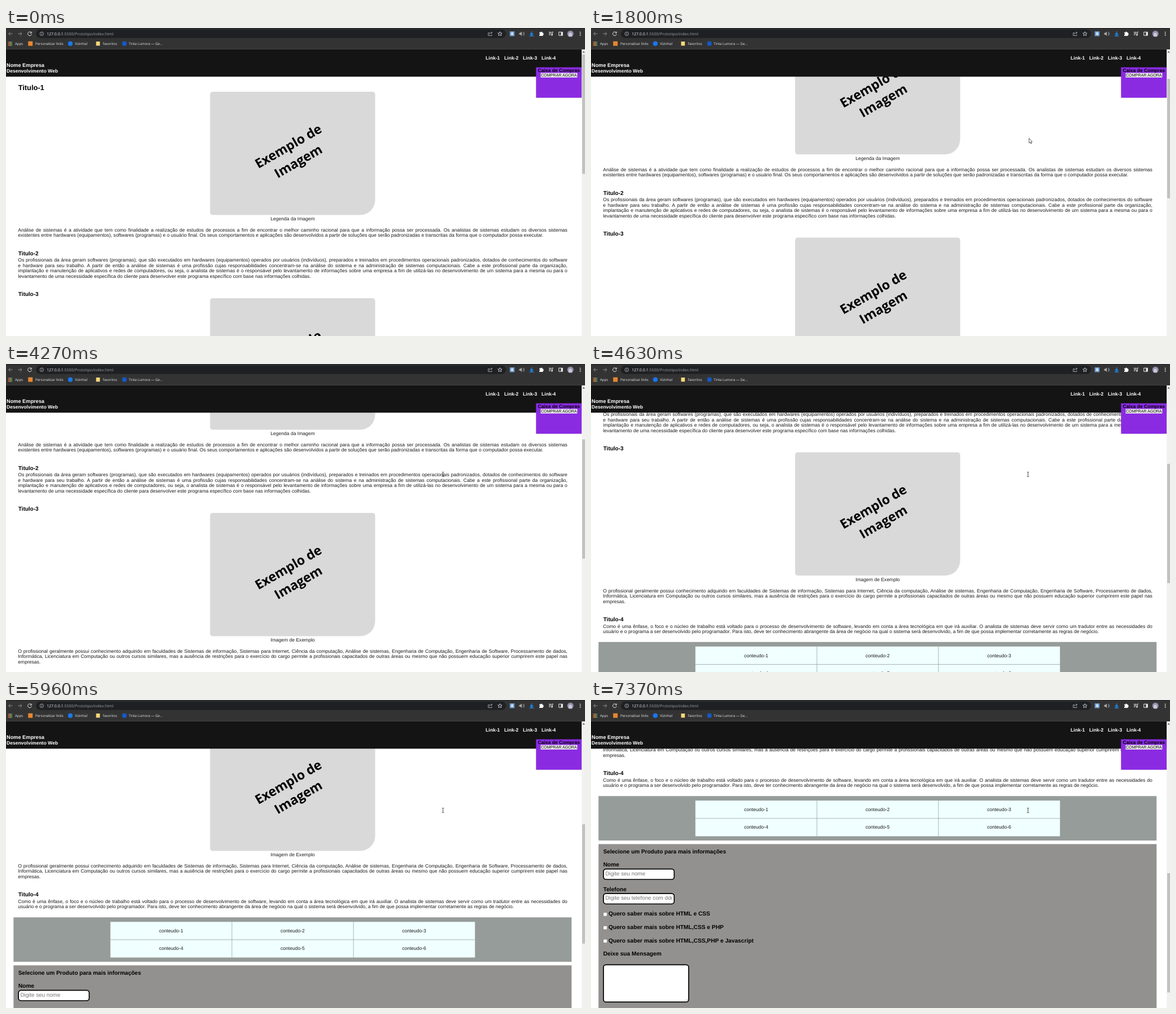
Animation of 1025x546 px, one loop 8000 ms. Source, as an HTML page:

```html
<!DOCTYPE html>
<html lang="pt-BR">
<head>
<meta charset="utf-8">
<title>Protótipo</title>
<style>
html, body { margin: 0; width: 100%; height: 100%; overflow: hidden; background: #fff; }
body { font: 8.54px "Liberation Sans", Arial, sans-serif; color: #000; text-rendering: geometricPrecision; }
#stage { position: absolute; left: 0; top: 0; width: 1025px; height: 546px; overflow: hidden; }
#page { position: absolute; left: 0; top: 0; width: 1019px; height: 1300px; }
.t, svg { position: absolute; }
.t { line-height: 0; white-space: nowrap; }
.b { font-weight: bold; }
.h1 { font-size: 12.8px; }
.h3 { font-size: 10px; }
.label { font-size: 10.2px; }
.mid { width: 300px; text-align: center; }
.full { width: 972.5px; text-align: justify; text-align-last: justify; white-space: normal; }
.body { color: #1a1a1a; }
.white { color: #fff; }
.hint { color: #757575; font-size: 9.8px; width: 118.5px; clip-path: inset(-10px 0); }
.btn { font-size: 7.12px; }
svg { left: 0; top: 0; overflow: visible; }
.ui { font-family: "Open Sans", "Noto Sans", sans-serif; fill: #e8eaed; font-size: 6.1px; }
.pictext { font: bold 23px "Open Sans", "Noto Sans", sans-serif; text-anchor: middle; }
</style>
</head>
<body>
<div id="stage">
  <div id="page"></div>
  <div id="fixed"></div>
  <svg id="chrome" width="1025" height="546">
    <path d="M0 0H1025V38H0Z" fill="#333334"/>
    <path d="M0 0H1025V1H0Z" fill="#202124"/>
    <path d="M0 37.2H1025V38H0Z" fill="#48494b"/>
    <rect x="53" y="2.6" width="832" height="15.2" rx="7.6" fill="#1f2023"/>
    <g fill="none" stroke="#e8eaed" stroke-width="1">
      <path d="M11.5 10.2H4.5M7.8 6.9L4.5 10.2L7.8 13.5M21 10.2H28M24.7 6.9L28 10.2L24.7 13.5" stroke="#8b8d90"/>
      <path d="M44.4 7.8A3.4 3.4 0 1 0 45.3 11M45.2 6.4V9H42.6"/>
      <circle cx="63.3" cy="10.2" r="3.3" stroke="#bdc1c6" stroke-width=".8"/>
      <path d="M63.3 9.7V12M63.3 8.2V9" stroke="#bdc1c6"/>
      <path d="M856 8.5H853.7V13.5H860V11.7M855.7 11.5C856 9 857.5 8.4 860.5 8.4M858.7 6.5L860.7 8.4L858.7 10.3" stroke="#bdc1c6" stroke-width=".8"/>
      <path d="M874.4 6.5L875.4 9L878.2 9.2L876.1 11L876.8 13.7L874.4 12.2L872 13.7L872.7 11L870.6 9.2L873.4 9Z" stroke-width=".8"/>
      <path d="M914.8 8A3 3 0 0 1 914.8 12.6M916 6.7A5 5 0 0 1 916 13.9" stroke="#aaa" stroke-width=".8"/>
      <path d="M930.5 6V12M927.7 9.5L930.5 12.3L933.3 9.5M926.8 14H934.2" stroke="#2389f7" stroke-width="1.4"/>
      <path d="M961 7.5H966M961 9.7H966M961 11.9H964M967.3 12V7H969"/>
      <path d="M978.7 7.2H985.3V13.2H978.7Z"/>
    </g>
    <rect x="891.8" y="6" width="8.4" height="8.4" fill="#6f9fd0"/>
    <path d="M894.7 7.5H897.3V10H899L896 13L893 10H894.7Z" fill="#dfe6ee"/>
    <path d="M908.5 8.7H910.3L913 6.3V14L910.3 11.7H908.5Z" fill="#aaa"/>
    <path d="M944 7.7H946.2A1.3 1.3 0 1 1 948.8 7.7H950.6V9.4A1.3 1.3 0 1 1 950.6 12V14H944V12A1.3 1.3 0 0 0 944 9.4Z" fill="#fff"/>
    <circle cx="966.4" cy="12.3" r="1.3" fill="#e8eaed"/>
    <path d="M982.5 7.2H985.3V13.2H982.5Z" fill="#e8eaed"/>
    <circle cx="999.2" cy="10.2" r="5.6" fill="#8e8ba6"/>
    <path d="M996 15V11Q996 8 999 8T1002 11V15Z" fill="#c9c6d8"/>
    <g id="dots"></g>
    <rect x="39.2" y="23.6" width="8" height="8" fill="#e8862d"/>
    <circle cx="113.9" cy="27.7" r="4.1" fill="#1877f2"/>
    <path d="M159.5 24H166.2V31.3H159.5Z" fill="#fbd978"/>
    <circle cx="209.6" cy="27.7" r="4.1" fill="#1459c4"/>
    <g class="ui">
      <text x="72" y="12.8" font-size="7"><tspan>127.0.0.1</tspan><tspan fill="#9aa0a6">:5500/Prototipo/index.html</tspan></text>
      <text x="16" y="29.9">Apps</text>
      <text x="52" y="29.9">Personalizar links</text>
      <text x="122" y="29.9">Vizinhal</text>
      <text x="171.6" y="29.9">favoritos</text>
      <text x="217.3" y="29.9">Tinta Lumora — Ge...</text>
    </g>
    <path d="M1019.3 38H1025V546H1019.3Z" fill="#f1f1f1"/>
    <path d="M1020.4 43.5L1022.6 41L1024.8 43.5Z" fill="#505050"/>
    <rect id="thumb" x="1020" y="47" width="5" height="211.5" fill="#c1c1c1"/>
    <g id="cursor">
      <path id="arrow" d="M0 0V8.6L2 6.8L3.3 9.8L4.6 9.2L3.3 6.4H5.8Z" fill="#fff" stroke="#222" stroke-width=".7"/>
      <path id="beam" d="M-1.8 -4H-.4L0 -3.6L.4 -4H1.8M0 -3.6V3.6M-1.8 4H-.4L0 3.6L.4 4H1.8" fill="none" stroke="#222" stroke-width=".8"/>
    </g>
  </svg>
</div>
<script>
const $ = id => document.getElementById(id);
const text = (x, y, s, cls = "") => `<div class="t ${cls}" style="left:${x}px;top:${y}px">${s}</div>`;
const mid = (x, y, s, cls = "") => text(x - 150, y, s, "mid " + cls);
const svg = s => `<svg width="1" height="1">${s}</svg>`;
const box = (x, y, w, h, fill, more = "") =>
  svg(`<rect x="${x}" y="${y}" width="${w}" height="${h}" fill="${fill}" ${more}/>`);
const title = (y, s, size = "h3") => text(21.7, y + .6, s, "b " + size);
const para = (y, lines) => lines.map((s, i) =>
  text(21.3, y + i * 9.61, s, "body" + (i < lines.length - 1 ? " full" : ""))).join("");
const picture = (y, caption) => svg(`<g transform="translate(361.3 ${y})">
  <path d="M5.3 0H286.9Q292.2 0 292.2 5.3V191.8A26.7 26.7 0 0 1 265.5 218.5H5.3Q0 218.5 0 213.2V5.3Q0 0 5.3 0Z" fill="#d9d9d9"/>
  <g class="pictext" transform="translate(146.7 111) rotate(-30)">
  <text y="-8.5">Exemplo de</text><text x="2" y="23.5">Imagem</text></g></g>`) +
  mid(507.5, y + 225.2, caption, "body");
const field = (y, w, h, hint = "") =>
  box(22.1, y + .8, w - 1.6, h - 1.6, "#fff", `rx="4.5" stroke="#000" stroke-width="1.7"`) +
  text(25.4, y + h / 2 + .1, hint, "hint");
const check = (y, s) => box(21.9, y - 2.9, 6.4, 6.4, "#fff", `rx="1" stroke="#767676" stroke-width=".6"`) +
  text(31, y + .6, s, "b label");

const cells = [0, 1, 2, 3, 4, 5].map(i =>
  mid(292.3 + i % 3 * 215.1, 838.6 + (i > 2) * 31.6, "conteudo-" + (i + 1), "body")).join("");

$("page").innerHTML =
  title(105, "Titulo-1", "h1") +
  picture(113, "Legenda da Imagem") +
  para(357.6, [
    "Análise de sistemas é a atividade que tem como finalidade a realização de estudos de processos a fim de encontrar o melhor caminho racional para que a informação possa ser processada. Os analistas de sistemas estudam os diversos sistemas",
    "existentes entre hardwares (equipamentos), softwares (programas) e o usuário final. Os seus comportamentos e aplicações são desenvolvidos a partir de soluções que serão padronizadas e transcritas da forma que o computador possa executar."]) +
  title(400, "Titulo-2") +
  para(410.9, [
    "Os profissionais da área geram softwares (programas), que são executados em hardwares (equipamentos) operados por usuários (indivíduos), preparados e treinados em procedimentos operacionais padronizados, dotados de conhecimentos do software",
    "e hardware para seu trabalho. A partir de então a análise de sistemas é uma profissão cujas responsabilidades concentram-se na análise do sistema e na administração de sistemas computacionais. Cabe a este profissional parte da organização,",
    "implantação e manutenção de aplicativos e redes de computadores, ou seja, o analista de sistemas é o responsável pelo levantamento de informações sobre uma empresa a fim de utilizá-las no desenvolvimento de um sistema para a mesma ou para o",
    "levantamento de uma necessidade específica do cliente para desenvolver este programa específico com base nas informações colhidas."]) +
  title(472.5, "Titulo-3") +
  picture(479, "Imagem de Exemplo") +
  para(723.7, [
    "O profissional geralmente possui conhecimento adquirido em faculdades de Sistemas de informação, Sistemas para Internet, Ciência da computação, Análise de sistemas, Engenharia de Computação, Engenharia de Software, Processamento de dados,",
    "Informática, Licenciatura em Computação ou outros cursos similares, mas a ausência de restrições para o exercício do cargo permite a profissionais capacitados de outras áreas ou mesmo que não possuem educação superior cumprirem este papel nas",
    "empresas."]) +
  title(775.7, "Titulo-4") +
  para(786.6, [
    "Como é uma ênfase, o foco e o núcleo de trabalho está voltado para o processo de desenvolvimento de software, levando em conta a área tecnológica em que irá auxiliar. O analista de sistemas deve servir como um tradutor entre as necessidades do",
    "usuário e o programa a ser desenvolvido pelo programador. Para isto, deve ter conhecimento abrangente da área de negócio na qual o sistema será desenvolvido, a fim de que possa implementar corretamente as regras de negócio."]) +
  box(13.3, 815.3, 987.9, 78.8, "#969c99") +
  box(184.8, 823.3, 645.4, 63.2, "#f0ffff") +
  [399.6, 614.7].map(x => box(x, 823.3, .7, 63.2, "#8a9494")).join("") +
  box(184.8, 854.6, 645.4, .7, "#8a9494") + cells +
  box(13.3, 900.4, 987.9, 400, "#93918f") +
  title(914, "Selecione um Produto para mais informações") +
  title(937.7, "Nome", "label") + field(943.8, 126.8, 20, "Digite seu nome") +
  title(981.2, "Telefone", "label") + field(987.3, 126.8, 20, "Digite seu telefone com ddd") +
  check(1024.7, "Quero saber mais sobre HTML e CSS") +
  check(1048.4, "Quero saber mais sobre HTML,CSS e PHP") +
  check(1072.1, "Quero saber mais sobre HTML,CSS,PHP e Javascript") +
  title(1095.7, "Deixe sua Mensagem", "label") + field(1113.6, 152.4, 67.6) +
  svg(`<path d="M167.5 1178.3L171 1174.8M169.7 1178.3L171 1177" stroke="#777" stroke-width=".6"/>`);

$("fixed").innerHTML =
  box(0, 38, 1019.3, 48.3, "#141414") +
  text(1, 66, `<span style="font-size:9.2px">Nome Empresa</span>`, "b white") +
  text(1, 76, "Desenvolvimento Web", "b white") +
  [1, 2, 3, 4].map(i => text(816.1 + 33 * i, 53, "Link-" + i, "b white")).join("") +
  box(938.3, 69.7, 81, 54, "#8a2be2") +
  mid(978.8, 74.6, "Caixa de Compras", "b") +
  box(946.5, 79.7, 64.8, 8, "#efefef") +
  mid(978.8, 84, "COMPRAR AGORA", "btn");

let dots = "";
for (let i = 0; i < 9; i++) {
  const color = ["#ee675c", "#fcc934", "#5bb974", "#669df6"][(i + (i / 3 | 0)) % 4];
  dots += `<rect x="${3.7 + i % 3 * 2.7}" y="${24.3 + (i / 3 | 0) * 2.7}" width="1.8" height="1.8" fill="${color}"/>`;
}
for (let i = 0; i < 3; i++) dots += `<circle cx="1016.6" cy="${7.4 + i * 2.8}" r=".9" fill="#e8eaed"/>`;
$("dots").innerHTML = dots;

// Stepped progress: jumps to phase p0 at `from`, reaches 1 at `to`.
function progress(t, from, to, steps, p0) {
  if (t < from) return 0;
  const k = Math.min(steps - 1, Math.floor((t - from) / (to - from) * (steps - 1) + 1e-6));
  return p0 + (1 - p0) * k / (steps - 1);
}
const ease = p => p * p * (3 - 2 * p);

// from, to, steps, first phase, distance
const wheel = [
  [1600, 1800, 4, .07, 107.5],
  [2940, 3080, 3, .255, 107.5],
  [4270, 4630, 6, 0, 107.5],
  [5820, 5960, 3, .255, 107.5],
  [7080, 7370, 5, .05, 215]
];

function draw(t) {
  const y = wheel.reduce((sum, [a, b, n, p0, d]) => sum + d * ease(progress(t, a, b, n, p0)), 0);
  $("page").style.transform = `translateY(${-y}px)`;
  $("thumb").setAttribute("y", 47 + y * .403);

  const reading = t >= 4270;
  const rest = (1 - progress(t, 110, 740, 10, .02)) ** 2;
  const pos = reading ? [773.6, 195.7] : [775.4 + 232 * rest, 195.4 + 352 * rest];
  $("cursor").setAttribute("transform", `translate(${pos})`);
  $("cursor").style.display = t < 110 ? "none" : "";
  $("arrow").style.display = reading ? "none" : "";
  $("beam").style.display = reading ? "" : "none";
}

const start = performance.now();
(function frame() {
  draw((performance.now() - start) % 8000);
  requestAnimationFrame(frame);
})();
</script>
</body>
</html>
```
